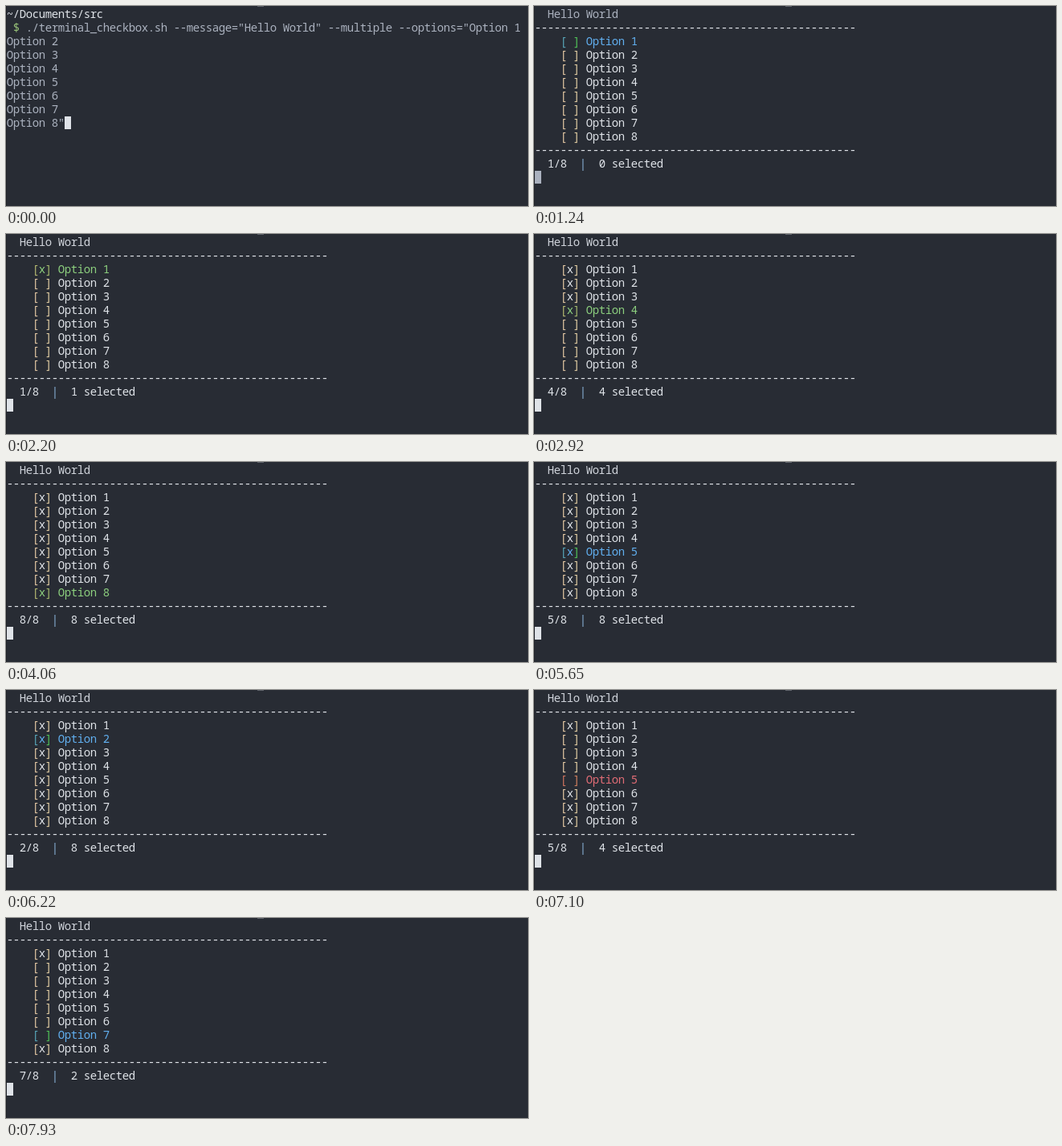
Recreate the animation shown at these times as an HTML page with a canvas. Size 650x250 px, loop 8000 ms.

```html
<!DOCTYPE html>
<html lang="en">
<head>
<meta charset="utf-8">
<title>Terminal checkbox</title>
<style>
  html, body { margin: 0; width: 100%; height: 100%; overflow: hidden; background: #282c34; }
  canvas { display: block; }
</style>
</head>
<body>
<canvas width="650" height="250"></canvas>
<script>
const ctx = document.querySelector('canvas').getContext('2d', { alpha: false });
const LOOP = 8000, CELL = 8, LINE = 17, COUNT = 8;
const WHITE = '#dfe3e8', GRAY = '#abb2bf';

// Text colour and bracket tints for each kind of row
const STYLES = {
  plain:    { text: WHITE,     open: '#e3c7a4', close: '#e3cfa4' },
  move:     { text: '#61afef', open: '#58a5b8', close: '#50c458' },
  select:   { text: '#8ccf7e', open: '#b4b870', close: '#a4b96c' },
  unselect: { text: '#e06c75', open: '#d07460', close: '#d08060' }
};

// [time in ms, highlighted option, mode]
const STEPS = [
  [1240, 1, 'move'],
  [2200, 1, 'select'], [2530, 2, 'select'], [2740, 3, 'select'], [2920, 4, 'select'],
  [3120, 5, 'select'], [3270, 6, 'select'], [3560, 7, 'select'], [4060, 8, 'select'],
  [4280, 8, 'move'], [4950, 7, 'move'], [5540, 6, 'move'], [5650, 5, 'move'],
  [5820, 4, 'move'], [5960, 3, 'move'], [6220, 2, 'move'],
  [6530, 2, 'unselect'], [6760, 3, 'unselect'], [6890, 4, 'unselect'],
  [7100, 5, 'unselect'], [7300, 6, 'unselect'], [7540, 7, 'unselect'],
  [7930, 7, 'move']
];

// Writes text on the terminal grid, one character per cell
function write(text, col, line, color) {
  ctx.fillStyle = color;
  [...text].forEach((char, i) =>
    ctx.fillText(char, 1 + (col + i + 0.5) * CELL, line * LINE + 15));
}

function cursor(col, line, color) {
  ctx.fillStyle = color;
  ctx.fillRect(1 + col * CELL, line * LINE + 2, CELL, LINE - 1);
}

function drawPrompt() {
  write('~/Documents/src', 0, 0, WHITE);
  write('$', 1, 1, '#98c379');
  write('./terminal_checkbox.sh --message="Hello World" --multiple --options="Option 1', 3, 1, GRAY);
  for (let n = 2; n <= COUNT; n++) {
    write(`Option ${n}${n === COUNT ? '"' : ''}`, 0, n, GRAY);
  }
  cursor(9, 8, WHITE);
}

function drawMenu(time) {
  const selected = new Set();
  let current, mode;
  for (const [start, option, stepMode] of STEPS) {
    if (start > time) break;
    [current, mode] = [option, stepMode];
    if (mode === 'select') selected.add(option);
    if (mode === 'unselect') selected.delete(option);
  }

  const active = time >= 2200;
  const rule = '-'.repeat(50);
  write('Hello World', 2, 0, active ? '#d0d4db' : GRAY);
  write(rule, 0, 1, WHITE);
  for (let n = 1; n <= COUNT; n++) {
    const style = STYLES[n === current ? mode : 'plain'];
    write('[', 4, n + 1, style.open);
    if (selected.has(n)) write('x', 5, n + 1, style.text);
    write(']', 6, n + 1, style.close);
    write(`Option ${n}`, 8, n + 1, style.text);
  }
  write(rule, 0, 10, WHITE);
  write(`${current}/${COUNT}`, 2, 11, WHITE);
  write('|', 7, 11, '#8db8e0');
  write(`${selected.size} selected`, 10, 11, WHITE);
  if (time >= 4320 && time < 4950) {
    write('|', 22, 11, '#8db8e0');
    write('current line copied', 25, 11, WHITE);
  }
  cursor(0, 12, active ? WHITE : GRAY);
}

function draw(now) {
  const time = now % LOOP;
  ctx.fillStyle = '#282c34';
  ctx.fillRect(0, 0, 650, 250);
  ctx.fillStyle = '#1f2228';
  ctx.fillRect(0, 0, 1, 250);
  ctx.fillStyle = '#60646b';
  ctx.fillRect(313, 0, 8, 1);
  ctx.font = '14px "Noto Sans Mono", monospace';
  ctx.textAlign = 'center';
  if (time < STEPS[0][0]) drawPrompt();
  else drawMenu(time);
}

const start = performance.now();
function tick() {
  draw(performance.now() - start);
  requestAnimationFrame(tick);
}
tick();
</script>
</body>
</html>
```
